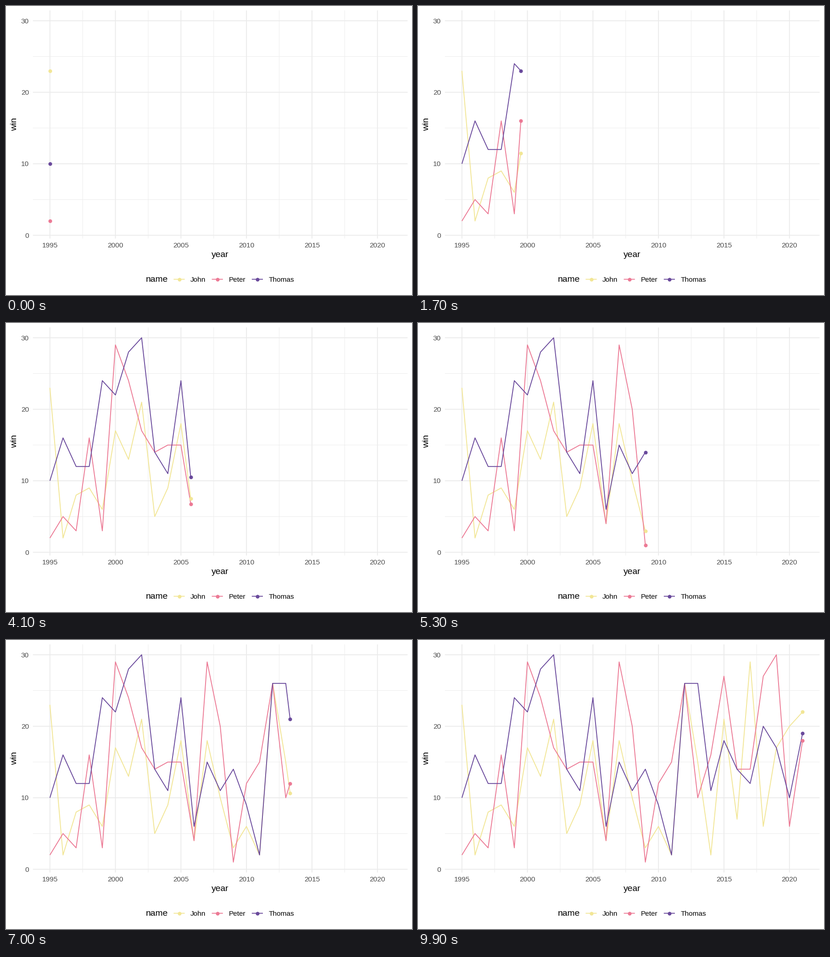
These frames come from a looping animation (885 px wide and 632 px high, 10000 ms). A matplotlib script:

```python
import numpy as np
import matplotlib.pyplot as plt
from matplotlib.animation import FuncAnimation

W, H, DPI = 885, 632, 100
FRAMES, INTERVAL = 100, 100
PX = 72 / DPI  # points per pixel

LEFT, RIGHT, TOP, BOTTOM = 58.6, 875.4, 9.6, 508.5
FIRST, LAST = 1995, 2021
X_RANGE = (FIRST - 1.3, LAST + 1.3)
Y_RANGE = (-0.45, 31.45)

GRID, TICK = "#EBEBEB", "#4D4D4D"
LINE_W, DOT = 1.87, 8.1
SMALL, LARGE = 15.4, 19.25

# name: colour, legend key centre, wins per year
SERIES = {
    "John": ("#F2E696", 377.5,
             [23, 2, 8, 9, 6, 17, 13, 21, 5, 9, 18, 4, 18, 10, 3, 6, 2, 26,
              15, 2, 21, 7, 29, 6, 17, 20, 22]),
    "Peter": ("#EC7A95", 460.7,
              [2, 5, 3, 16, 3, 29, 24, 17, 14, 15, 15, 4, 29, 20, 1, 12, 15,
               26, 10, 16, 27, 14, 14, 27, 30, 6, 18]),
    "Thomas": ("#6A4A9C", 547.9,
               [10, 16, 12, 12, 24, 22, 28, 30, 14, 11, 24, 6, 15, 11, 14, 9,
                2, 26, 26, 11, 18, 14, 12, 20, 17, 10, 19]),
}

plt.rcParams["font.family"] = "Liberation Sans"
fig = plt.figure(figsize=(W / DPI, H / DPI), dpi=DPI, facecolor="white")
ax = fig.add_axes([0, 0, 1, 1])
ax.set(xlim=(0, W), ylim=(H, 0))
ax.axis("off")


def px(year):
    lo, hi = X_RANGE
    return LEFT + (np.asarray(year) - lo) / (hi - lo) * (RIGHT - LEFT)


def py(win):
    lo, hi = Y_RANGE
    return BOTTOM - (np.asarray(win) - lo) / (hi - lo) * (BOTTOM - TOP)


def line(x, y, color, width=LINE_W, z=1):
    return ax.plot(x, y, color=color, lw=width * PX, zorder=z, snap=False,
                   solid_capstyle="butt", solid_joinstyle="round")[0]


def dot(x, y, color, z=4):
    return ax.plot([x], [y], "o", color=color, ms=DOT * PX, mew=0,
                   zorder=z, snap=False)[0]


def label(x, y, text, size=SMALL, color="black", ha="left", **kw):
    ax.text(x, y, text, fontsize=size * PX, color=color, ha=ha,
            va="baseline", **kw)


def v_grid(year, width, z):
    line([px(year)] * 2, [TOP, BOTTOM], GRID, width, z)


def h_grid(win, width, z):
    line([LEFT, RIGHT], [py(win)] * 2, GRID, width, z)


# Grid and axis text
for year in np.arange(1997.5, 2020, 5):
    v_grid(year, LINE_W / 2, 1)
for win in (5, 15, 25):
    h_grid(win, LINE_W / 2, 1)
for win in (0, 10, 20, 30):
    h_grid(win, LINE_W, 2)
    label(49.9, py(win) + 5.4, str(win), color=TICK, ha="right")
for year in range(1995, 2021, 5):
    v_grid(year, LINE_W, 2)
    label(px(year), 528, str(year), color=TICK, ha="center")

label((LEFT + RIGHT) / 2, 549, "year", LARGE, ha="center")
ax.text(22.9, (TOP + BOTTOM) / 2, "win", fontsize=LARGE * PX, rotation=90,
        rotation_mode="anchor", ha="center", va="baseline")

# Legend
KEY_Y = 597.6
label(304.5, 603.2, "name", LARGE)
for name, (color, key_x, _) in SERIES.items():
    line([key_x - 12.1, key_x + 12.1], [KEY_Y] * 2, color)
    dot(key_x, KEY_Y, color)
    label(key_x + 24.6, 603, name)

trails = [line([], [], color, z=3) for color, _, _ in SERIES.values()]
heads = [dot(0, 0, color) for color, _, _ in SERIES.values()]

# Each year is reached on a whole frame
years = np.arange(FIRST, LAST + 1)
arrival = np.round((years - FIRST) * (FRAMES - 1) / (LAST - FIRST))


def update(frame):
    now = np.interp(frame, arrival, years)
    past = years < now
    x = px(np.append(years[past], now))
    for trail, head, (_, _, wins) in zip(trails, heads, SERIES.values()):
        y = py(np.append(np.array(wins)[past], np.interp(now, years, wins)))
        trail.set_data(x, y)
        head.set_data(x[-1:], y[-1:])
    return trails + heads


anim = FuncAnimation(fig, update, frames=FRAMES, interval=INTERVAL,
                     repeat=True, repeat_delay=0, blit=False)
plt.show()
```
